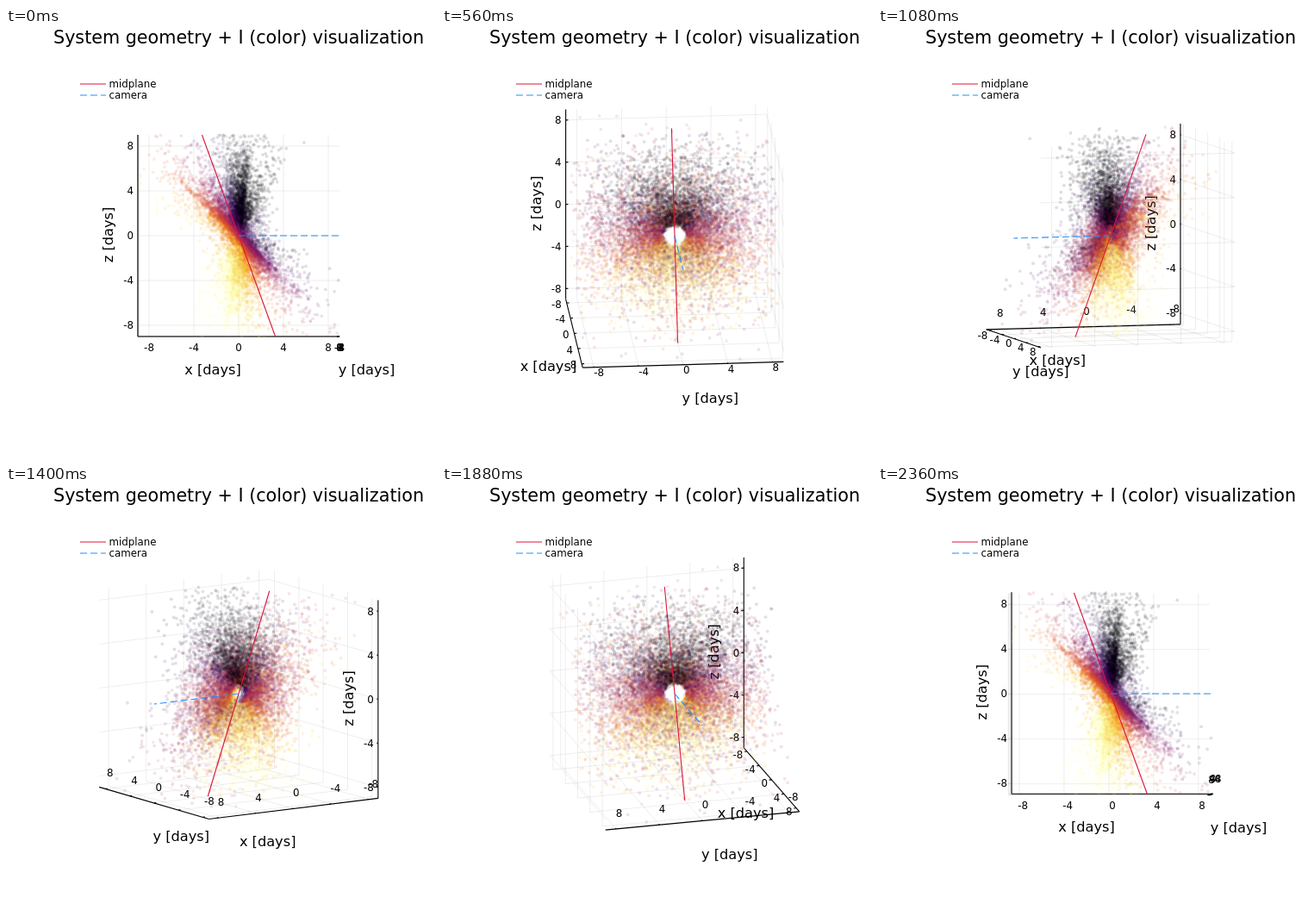
Write an HTML page with a canvas that moves like this. It is 499 by 499 pixels and loops after 2.4 s.

```html
<!DOCTYPE html>
<html lang="en">
<head>
<meta charset="utf-8">
<title>System geometry</title>
<style>
  html, body { margin: 0; width: 100%; height: 100%; overflow: hidden; background: #fff; }
  canvas { display: block; }
</style>
</head>
<body>
<canvas id="stage" width="499" height="499"></canvas>
<script>
const ctx = document.getElementById('stage').getContext('2d');
const FONT = '"DejaVu Sans", sans-serif';
const RAD = Math.PI / 180;
const STEPS = 60, STEP_MS = 40;
const CX = 270, CY = 241, UNIT = 13, LIM = 9;
const TICKS = [-8, -4, 0, 4, 8];
const TILT = 70 * RAD, OPENING = 29 * RAD;
const RED = '#dc143c', BLUE = '#1e90ff';
const INFERNO = ['000004', '1b0c41', '4a0c6b', '781c6d', 'a52c60', 'cf4446', 'ed6925', 'fb9b06', 'f7d13d', 'fcffa4']
  .map(hex => [0, 2, 4].map(i => parseInt(hex.slice(i, i + 2), 16)));

let seed = 20;
function random() {
  seed = (seed + 0x6d2b79f5) | 0;
  let t = Math.imul(seed ^ (seed >>> 15), 1 | seed);
  t = (t + Math.imul(t ^ (t >>> 7), 61 | t)) ^ t;
  return ((t ^ (t >>> 14)) >>> 0) / 4294967296;
}

function inferno(t, alpha) {
  const p = Math.min(1, Math.max(0, t)) * (INFERNO.length - 1);
  const i = Math.min(INFERNO.length - 2, Math.floor(p));
  const rgb = INFERNO[i].map((c, k) => Math.round(c + (INFERNO[i + 1][k] - c) * (p - i)));
  return `rgba(${rgb},${alpha})`;
}

// Fan of disks hinged on the y axis, with a central hole and a little scatter
function makeCloud(count) {
  const cloud = [];
  while (cloud.length < count) {
    const r = 1 + 3.6 * (-Math.log(1 - random())) ** 0.8;
    const lon = random() * 2 * Math.PI;
    const side = random() < 0.5 + 0.2 * Math.cos(lon) ? 1 : -1;
    const hinge = side * OPENING * random() ** 0.4;
    const lat = Math.asin(Math.sin(hinge) * Math.abs(Math.cos(lon))) + 0.45 * (2 * random() - 1) ** 3;
    const up = r * Math.cos(lat) * Math.cos(lon) * Math.cos(hinge) / Math.hypot(Math.cos(hinge) * Math.cos(lon), Math.sin(lon));
    const across = r * Math.cos(lat) * Math.sin(lon) / Math.hypot(Math.cos(hinge) * Math.cos(lon), Math.sin(lon));
    const out = r * Math.sin(lat);
    const pos = [
      out * Math.sin(TILT) - up * Math.cos(TILT),
      across,
      out * Math.cos(TILT) + up * Math.sin(TILT)
    ];
    const level = 0.49 - (0.77 * pos[0] + 0.58 * pos[2]) / r;
    if (pos.every(v => Math.abs(v) <= LIM)) cloud.push({ pos, color: inferno(level, 0.13) });
  }
  return cloud;
}
const cloud = makeCloud(12000);

function camera(step) {
  const az = step * 359 / (STEPS - 1) * RAD;
  const el = 20 * Math.sin(az) * RAD;
  const ca = Math.cos(az), sa = Math.sin(az), ce = Math.cos(el), se = Math.sin(el);
  const project = ([x, y, z]) => [
    CX + UNIT * (x * ca + y * sa),
    CY - UNIT * (z * ce - (x * sa - y * ca) * se)
  ];
  return { ca, sa, project };
}

function polyline(points, color, width, dash = []) {
  ctx.beginPath();
  points.forEach(p => ctx.lineTo(...p));
  ctx.strokeStyle = color;
  ctx.lineWidth = width;
  ctx.setLineDash(dash);
  ctx.stroke();
}

function text(str, x, y, size, align = 'center') {
  ctx.font = `${size}px ${FONT}`;
  ctx.textAlign = align;
  ctx.fillText(str, x, y);
}

function drawGrid(project) {
  const line = pts => polyline(pts.map(project), 'rgba(0,0,0,0.07)', 1);
  for (const t of TICKS) {
    line([[t, -LIM, -LIM], [t, LIM, -LIM], [t, LIM, LIM]]);
    line([[LIM, t, -LIM], [-LIM, t, -LIM], [-LIM, t, LIM]]);
    line([[-LIM, -LIM, t], [-LIM, LIM, t], [LIM, LIM, t]]);
  }
}

function drawAxis(project, at, inward) {
  polyline([project(at(-LIM)), project(at(LIM))], '#000', 1.1);
  for (const t of TICKS) {
    const p = at(t);
    polyline([project(p), project(p.map((v, i) => v + inward[i] * 0.22))], '#000', 1.1);
  }
}

// Tick labels sit off the axis at a right angle, below or above depending on the view
function floorLabels(project, at, below) {
  const [ax, ay] = project(at(-LIM)), [bx, by] = project(at(LIM));
  const flat = Math.abs(by - ay) < 0.1;
  let nx = 0, ny = 1, shift = 7, align = 'center';
  if (!flat) {
    const len = Math.hypot(bx - ax, by - ay);
    nx = (ay - by) / len;
    ny = (bx - ax) / len;
    if ((ny > 0) !== below) { nx = -nx; ny = -ny; }
    shift = below ? 0 : -12.5;
    align = below && nx < 0 ? 'right' : 'left';
  }
  for (const t of TICKS) {
    const [x, y] = project(at(t));
    text(t, x + 6 * nx, y + 6 * ny + shift + 4.3, 11.8, align);
  }
}

function drawAxes({ ca, sa, project }) {
  const xAxis = t => [t, -LIM, -LIM];
  const yAxis = t => [LIM, t, -LIM];
  const zAxis = t => [-LIM, -LIM, t];
  drawAxis(project, xAxis, [0, 1, 0]);
  drawAxis(project, yAxis, [-1, 0, 0]);
  drawAxis(project, zAxis, [0, 1, 0]);

  ctx.fillStyle = '#000';
  floorLabels(project, xAxis, ca >= 0);
  floorLabels(project, yAxis, sa >= 0);
  for (const t of TICKS) {
    const [x, y] = project(zAxis(t));
    text(t, x - 5, y + 4.3, 11.8, 'right');
  }

  const [xx, xy] = project(xAxis(0)), [yx, yy] = project(yAxis(0)), [zx, zy] = project(zAxis(0));
  text('x [days]', xx - 30, xy + 44, 16.2);
  text('y [days]', yx + 31.5, yy + 44, 16.2);
  ctx.save();
  ctx.translate(zx - 29, zy - 1);
  ctx.rotate(-Math.PI / 2);
  text('z [days]', 0, 0, 16.2);
  ctx.restore();
}

function drawCloud(project) {
  for (const { pos, color } of cloud) {
    const [x, y] = project(pos);
    ctx.fillStyle = color;
    ctx.beginPath();
    ctx.arc(x, y, 1.9, 0, 2 * Math.PI);
    ctx.fill();
  }
}

function drawHeader() {
  ctx.fillStyle = '#000';
  text('System geometry + I (color) visualization', 270, 18, 20.7);
  polyline([[86, 65], [116, 65]], RED, 1);
  polyline([[86, 78], [116, 78]], BLUE, 1, [8, 4]);
  text('midplane', 119.5, 69, 11.8, 'left');
  text('camera', 119.5, 82, 11.8, 'left');
}

function draw(step) {
  const view = camera(step);
  const { project } = view;
  const edge = LIM / Math.tan(TILT);
  ctx.fillStyle = '#fff';
  ctx.fillRect(0, 0, 499, 499);
  drawGrid(project);
  drawAxes(view);
  drawCloud(project);
  polyline([project([-edge, 0, LIM]), project([edge, 0, -LIM])], RED, 1.1);
  polyline([project([0, 0, 0]), project([LIM, 0, 0])], BLUE, 1.1, [8, 4]);
  drawHeader();
}

let shown = -1;
function tick() {
  const step = Math.floor(performance.now() / STEP_MS) % STEPS;
  if (step !== shown) draw(shown = step);
  requestAnimationFrame(tick);
}
tick();
</script>
</body>
</html>
```
